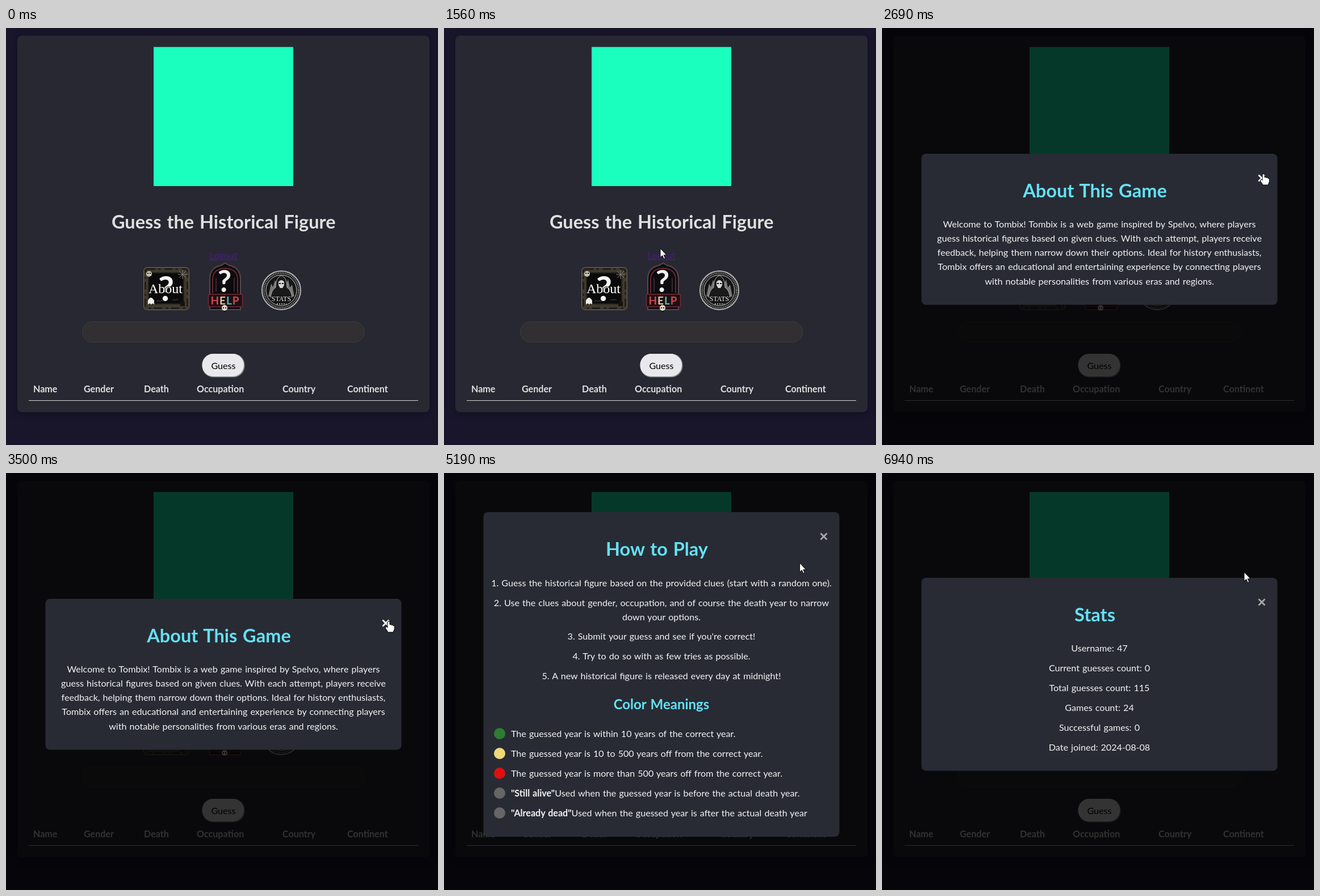
Write an HTML page that moves like this. It is 761x736 px and loops after 7 s.

```html
<!DOCTYPE html>
<html lang="en">
<head>
<meta charset="utf-8">
<title>Guess the Historical Figure</title>
<style>
html, body { margin: 0; width: 100%; height: 100%; overflow: hidden; background: #19162c; }
svg { display: block; font: 16.1px Lato, "Open Sans", sans-serif; }
text { word-spacing: .06em; }
.mid { text-anchor: middle; }
.bold { font-weight: 700; }
.panel { filter: drop-shadow(0 2px 8px rgba(0, 0, 0, .35)); }
.head { font-size: 32.5px; font-weight: 700; text-anchor: middle; }
.modal { fill: #f4f4f4; }
.serif { font-family: "Liberation Serif", serif; }
</style>
</head>
<body>
<svg width="761" height="736" viewBox="0 0 761 736">
  <rect width="761" height="736" fill="#19162c"/>
  <rect class="panel" x="20" y="13.5" width="726" height="664.5" rx="8" fill="#282832"/>
  <rect x="260" y="33.5" width="246" height="245.5" fill="#1affbd"/>
  <text class="head" x="383.3" y="353.6" fill="#e0e0e0">Guess the Historical Figure</text>
  <text class="mid" x="383" y="407" fill="#4c1a86" text-decoration="underline">Logout</text>

  <g id="about-icon">
    <rect x="242.5" y="422.5" width="80" height="75" rx="6" fill="#3f3a2e" stroke="#6b6554"/>
    <rect x="245.5" y="425.5" width="74" height="69" rx="4" fill="none" stroke="#241e1a" stroke-width="3" stroke-dasharray="14 5 4 7"/>
    <rect x="251" y="432" width="62" height="55" rx="3" fill="#0b0a0b" stroke="#25211d" stroke-width="2"/>
    <path d="M305 429l12 12m0-12l-12 12m6-14v16m-8-8h16" stroke="#8e897f"/>
    <circle cx="252" cy="434" r="5" fill="#c8c3b5"/>
    <path d="M249 433h2m2 0h2" stroke="#111" stroke-width="2"/>
    <path d="M250 488v-7q5-10 11 0v7l-3-2-2 2-3-2z" fill="#f1eee8"/>
    <path d="M307 491v-7q4-7 8 0v7z" fill="#151212"/>
    <path d="M265 483q4-4 6 0q3-4 6 0M293 481q3-4 5 0q3-4 6 0" fill="none" stroke="#55504a"/>
    <text class="mid bold" x="282" y="482" font-size="61" fill="#f7f7f7">?</text>
    <text class="mid serif" x="281" y="468" font-size="24" fill="#fff" stroke="#111" stroke-width="2" paint-order="stroke">About</text>
  </g>

  <g id="help-icon">
    <path d="M359 497V443q0-20 20-24l7-4 7 4q20 4 20 24v54z" fill="#0d0b0e" stroke="#55484a" stroke-width="2"/>
    <path d="M364 468V444q0-19 22-20q22 1 22 20v24" fill="none" stroke="#6b2530" stroke-width="2"/>
    <path d="M370 466v-25m32 25v-25" stroke="#37292e" stroke-width="2"/>
    <text class="mid bold" x="385" y="466" font-size="53" fill="#f3f1ee">?</text>
    <rect x="356.5" y="470" width="60" height="22" rx="2" fill="#181115" stroke="#7a2a36" stroke-width="1.5"/>
    <text class="mid bold" x="386" y="488" font-size="19" letter-spacing="1"><tspan fill="#d84450">H</tspan><tspan fill="#e6c19a">E</tspan><tspan fill="#5ab8ae">L</tspan><tspan fill="#d84450">P</tspan></text>
    <circle cx="385" cy="494" r="5" fill="#e8dfd3"/>
    <path d="M382 494h2m2 0h2M384 500h3" stroke="#181115" stroke-width="2"/>
  </g>

  <g id="stats-icon">
    <circle cx="485" cy="463" r="34" fill="#151516" stroke="#b7b7b7" stroke-width="2"/>
    <circle cx="485" cy="463" r="30.5" fill="none" stroke="#898989" stroke-width="3" stroke-dasharray="1.5 1.5"/>
    <circle cx="485" cy="463" r="27" fill="none" stroke="#d0d0d0"/>
    <path d="M462 474l5-23 3 6 4-12 4 8 7-12 8 11 4-8 3 14 4-5 4 21z" fill="#777"/>
    <path d="M466 475q2-13 9-17q0-18 10-21q10 3 10 21q7 4 9 17z" fill="#19191a" stroke="#aaa"/>
    <path d="M480 448q5-6 10 0v6l-3 5h-4l-3-5z" fill="#d5d5d5"/>
    <path d="M481 451h3m2 0h3" stroke="#111" stroke-width="2"/>
    <text class="mid serif" x="485" y="482" font-size="12" fill="#f2f2f2" stroke="#111" stroke-width="2" paint-order="stroke">STATS</text>
    <path d="M477 487h17" stroke="#aaa" stroke-width="2" stroke-dasharray="2 2"/>
  </g>

  <rect x="134.5" y="518.5" width="497" height="36" rx="18" fill="#312f31" stroke="#3b3e3d"/>
  <rect x="345.5" y="575" width="75" height="41.5" rx="20" fill="#86868b"/>
  <rect x="345.5" y="575" width="73.5" height="40" rx="19.5" fill="#e9e9ed"/>
  <text class="mid" x="383" y="602" fill="#000">Guess</text>
  <g id="columns" class="bold" fill="#dfdfe0"></g>
  <path d="M40 657.5H726" stroke="#d4d4d4"/>

  <rect id="shade" width="761" height="736" fill="#000" opacity=".78"/>
  <g id="modals"></g>

  <g id="cursor" stroke="#000" fill="#fff">
    <path id="arrow" d="M0 0V16L3.7 12.6 6.3 18.5 8.7 17.5 6.2 11.8H11.2Z"/>
    <path id="hand" d="M-2 1.5Q0-1 2 1.5V6.5Q4 5.5 5 7.2Q7 6.6 8 8.2Q10.5 8 10.5 11V14L8 20H-1L-5.5 13Q-6 10.3-3.5 10.5L-2 12Z"/>
    <path id="beam" d="M-3.5-6.5H-1L0-5.5 1-6.5H3.5M0-5.5V5.5M-3.5 6.5H-1L0 5.5 1 6.5H3.5" fill="none" stroke="#fff" stroke-width="1.2"/>
  </g>
</svg>
<script>
const $ = id => document.getElementById(id);
const LOOP = 7000, FADE = 300;

const text = (s, x, y, attrs = '') => `<text x="${x}" y="${y}" ${attrs}>${s}</text>`;
const centred = (lines, y, step) =>
  lines.map((s, i) => text(s, 383, y + i * step, 'class="mid"')).join('');

const columns = { Name: 48, Gender: 137, Death: 243, Occupation: 336, Country: 487, Continent: 601 };
$('columns').innerHTML = Object.entries(columns).map(([s, x]) => text(s, x, 643.4)).join('');

const meanings = [
  ['#2e7d32', 'The guessed year is within 10 years of the correct year.'],
  ['#f0d878', 'The guessed year is 10 to 500 years off from the correct year.'],
  ['#e01010', 'The guessed year is more than 500 years off from the correct year.'],
  ['#666', '<tspan class="bold">"Still alive"</tspan>Used when the guessed year is before the actual death year.'],
  ['#666', '<tspan class="bold">"Already dead"</tspan>Used when the guessed year is after the actual death year'],
].map(([color, s], i) => {
  const y = 460 + i * 35;
  return `<circle cx="98" cy="${y}" r="10" fill="${color}"/>` + text(s, 118, y + 6);
}).join('');

const modals = [
  { open: 2000, close: 3600, top: 222, height: 266.5, title: 'About This Game', body: centred([
    'Welcome to Tombix! Tombix is a web game inspired by Spelvo, where players',
    'guess historical figures based on given clues. With each attempt, players receive',
    'feedback, helping them narrow down their options. Ideal for history enthusiasts,',
    'Tombix offers an educational and entertaining experience by connecting players',
    'with notable personalities from various eras and regions.'], 352, 25.15) },
  { open: 4530, close: 5600, top: 69, height: 573, title: 'How to Play', body:
    centred(['1. Guess the historical figure based on the provided clues (start with a random one).'], 200, 0) +
    centred(['2. Use the clues about gender, occupation, and of course the death year to narrow',
      'down your options.'], 235, 25.15) +
    centred(["3. Submit your guess and see if you're correct!",
      '4. Try to do so with as few tries as possible.',
      '5. A new historical figure is released every day at midnight!'], 294, 35) +
    text('Color Meanings', 383, 417, 'class="mid bold" font-size="24" fill="#64e1f5"') + meanings },
  { open: 6400, close: LOOP, top: 185, height: 340.5, title: 'Stats', body: centred([
    'Username: 47', 'Current guesses count: 0', 'Total guesses count: 115',
    'Games count: 24', 'Successful games: 0', 'Date joined: 2024-08-08'], 315, 34.95) },
];

$('modals').innerHTML = modals.map(({ top, height, title, body }) => `<g class="modal">
  <rect x="69.5" y="${top}" width="627" height="${height}" rx="8" fill="#282b34"/>
  ${text(title, 375, top + 76.5, 'class="head" fill="#64e1f5"')}
  <path class="close" d="M663.5 ${top + 37.5}l11 11m0-11l-11 11" stroke-width="2.8"/>${body}</g>`).join('');
const groups = [...document.querySelectorAll('.modal')];

// Pointer path: time, x, y, shape from that time on
const path = [
  [1200, 470, 300, 'arrow'], [1560, 381, 389, 'arrow'], [1780, 296, 450, 'hand'],
  [1880, 288, 458, 'hand'], [2000, 288, 458, 'beam'], [2200, 288, 458, 'arrow'],
  [2600, 668, 260, 'hand'], [2690, 672, 257, 'hand'], [3000, 672, 257, 'hand'],
  [3500, 674, 261, 'hand'], [3600, 674, 261, 'arrow'], [3800, 674, 261, 'arrow'],
  [4330, 388, 458, 'hand'], [4450, 382, 464, 'hand'], [4530, 382, 464, 'beam'],
  [4850, 382, 464, 'arrow'], [5300, 669, 106, 'hand'], [5600, 669, 106, 'arrow'],
  [5940, 568, 331, 'arrow'], [6230, 486, 458, 'hand'], [6400, 486, 458, 'arrow'],
  [6560, 486, 458, 'arrow'], [6940, 638, 175, 'arrow'], [LOOP, 638, 175, 'arrow'],
];

function pointer(t) {
  const i = path.findIndex(p => p[0] > t);
  if (i < 1) return null;
  const [t0, x0, y0, shape] = path[i - 1], [t1, x1, y1] = path[i];
  const u = (t - t0) / (t1 - t0), e = u * u * (3 - 2 * u);
  return { x: x0 + (x1 - x0) * e, y: y0 + (y1 - y0) * e, shape };
}

const show = (el, on) => { el.style.display = on ? '' : 'none'; };

function draw() {
  const t = performance.now() % LOOP, p = pointer(t);
  const isOpen = m => t >= m.open && t < m.close;

  show($('shade'), modals.some(isOpen));
  modals.forEach((m, i) => {
    show(groups[i], isOpen(m));
    groups[i].style.opacity = Math.min(1, Math.max(0, (t - m.open) / FADE));
    groups[i].querySelector('.close').style.stroke = p && p.shape === 'hand' ? '#fff' : '#aaa';
  });

  show($('cursor'), p);
  if (p) {
    $('cursor').setAttribute('transform', `translate(${p.x} ${p.y})`);
    for (const shape of ['arrow', 'hand', 'beam']) show($(shape), shape === p.shape);
  }
  requestAnimationFrame(draw);
}
draw();
</script>
</body>
</html>
```
